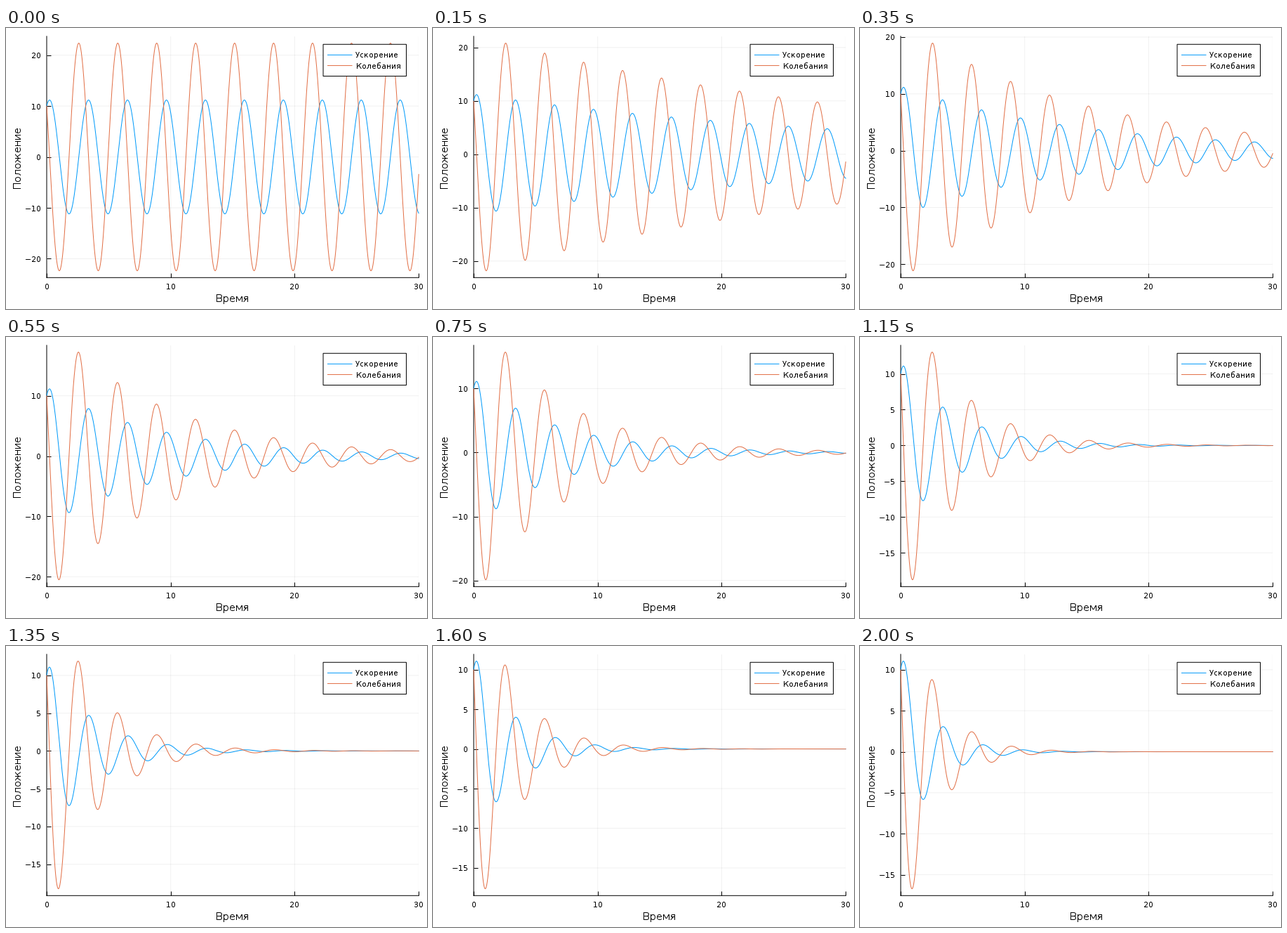
A matplotlib script for the animation above (2.05 s loop, 600 by 400 pixels).

```python
import numpy as np
import matplotlib.pyplot as plt
from matplotlib.animation import FuncAnimation
from matplotlib.patches import Rectangle
from matplotlib.ticker import MultipleLocator

W, H, DPI = 600, 400, 100
PX = 72 / DPI  # points per pixel
LEFT, RIGHT, TOP, BOTTOM = 58, 588.2, 11.8, 355.3
BLUE, ORANGE = "#009afa", "#e26f46"
FRAMES = 41
X0, V0, OMEGA0 = 10, 10, 2

plt.rcParams.update({
    "font.family": "DejaVu Sans",
    "font.size": 8,
    "text.hinting": "default",
    "text.hinting_factor": 1,
    "path.snap": False,
    "axes.linewidth": PX,
})

t = np.linspace(0, 30, 2001)


def oscillator(gamma):
    """Position and velocity of x'' + 2*gamma*x' + OMEGA0**2 * x = 0."""
    w = np.sqrt(OMEGA0**2 - gamma**2)
    b = (V0 + gamma * X0) / w
    decay, c, s = np.exp(-gamma * t), np.cos(w * t), np.sin(w * t)
    x = decay * (X0 * c + b * s)
    v = decay * w * (b * c - X0 * s) - gamma * x
    return x, v


def tick_step(lo, hi):
    count = np.floor(hi / 10) - np.ceil(lo / 10) + 1
    return 10 if count >= 4 else 5


fig = plt.figure(figsize=(W / DPI, H / DPI), dpi=DPI, facecolor="white")

ax = fig.add_axes([LEFT / W, 1 - BOTTOM / H, (RIGHT - LEFT) / W, (BOTTOM - TOP) / H])
ax.set_xlim(0, 30)
ax.xaxis.set_major_locator(MultipleLocator(10))
ax.set_axisbelow(True)
ax.grid(color="black", alpha=0.055, linewidth=PX)
ax.spines[["top", "right"]].set_visible(False)
ax.tick_params(direction="in", length=6 * PX, width=PX)
ax.tick_params(axis="x", pad=7.2 * PX)
ax.tick_params(axis="y", pad=8 * PX)
style = dict(linewidth=PX, zorder=3, clip_on=False)
pos_line, = ax.plot([], [], color=BLUE, **style)
vel_line, = ax.plot([], [], color=ORANGE, **style)

# Overlay in pixel coordinates for labels and legend
over = fig.add_axes([0, 0, 1, 1], zorder=5)
over.set_xlim(0, W)
over.set_ylim(H, 0)
over.axis("off")
over.text((LEFT + RIGHT) / 2, 389.6, "Время", size=11, ha="center", va="baseline")
over.text(16.6, (TOP + BOTTOM) / 2 + 0.4, "Положение", size=11, rotation=90,
          ha="center", va="center")

# Legend inset by a thirtieth of the plot on each side
box_right = RIGHT - (RIGHT - LEFT) / 30
box_top = TOP + (BOTTOM - TOP) / 30
box_w, row = 118.5, 15.1
over.add_patch(Rectangle((box_right - box_w, box_top), box_w, 3 * row,
                         facecolor="white", edgecolor="black", linewidth=PX))
entries = ((BLUE, "Ускорение"), (ORANGE, "Колебания"))
for n, (color, name) in enumerate(entries, 1):
    y = box_top + n * row
    over.plot([458, 493.5], [y, y], color=color, linewidth=PX,
              solid_capstyle="butt")
    over.text(498.5, y + 4.1, name, va="baseline")


def update(i):
    x, v = oscillator(0.01 * i)
    pos_line.set_data(t, x)
    vel_line.set_data(t, v)
    lo, hi = min(x.min(), v.min()), max(x.max(), v.max())
    pad = 0.03 * (hi - lo)
    lo, hi = lo - pad, hi + pad
    ax.yaxis.set_major_locator(MultipleLocator(tick_step(lo, hi)))
    ax.set_ylim(lo, hi)
    return pos_line, vel_line


anim = FuncAnimation(fig, update, frames=FRAMES, interval=50, repeat=True,
                     repeat_delay=0, blit=False)
plt.show()
```
